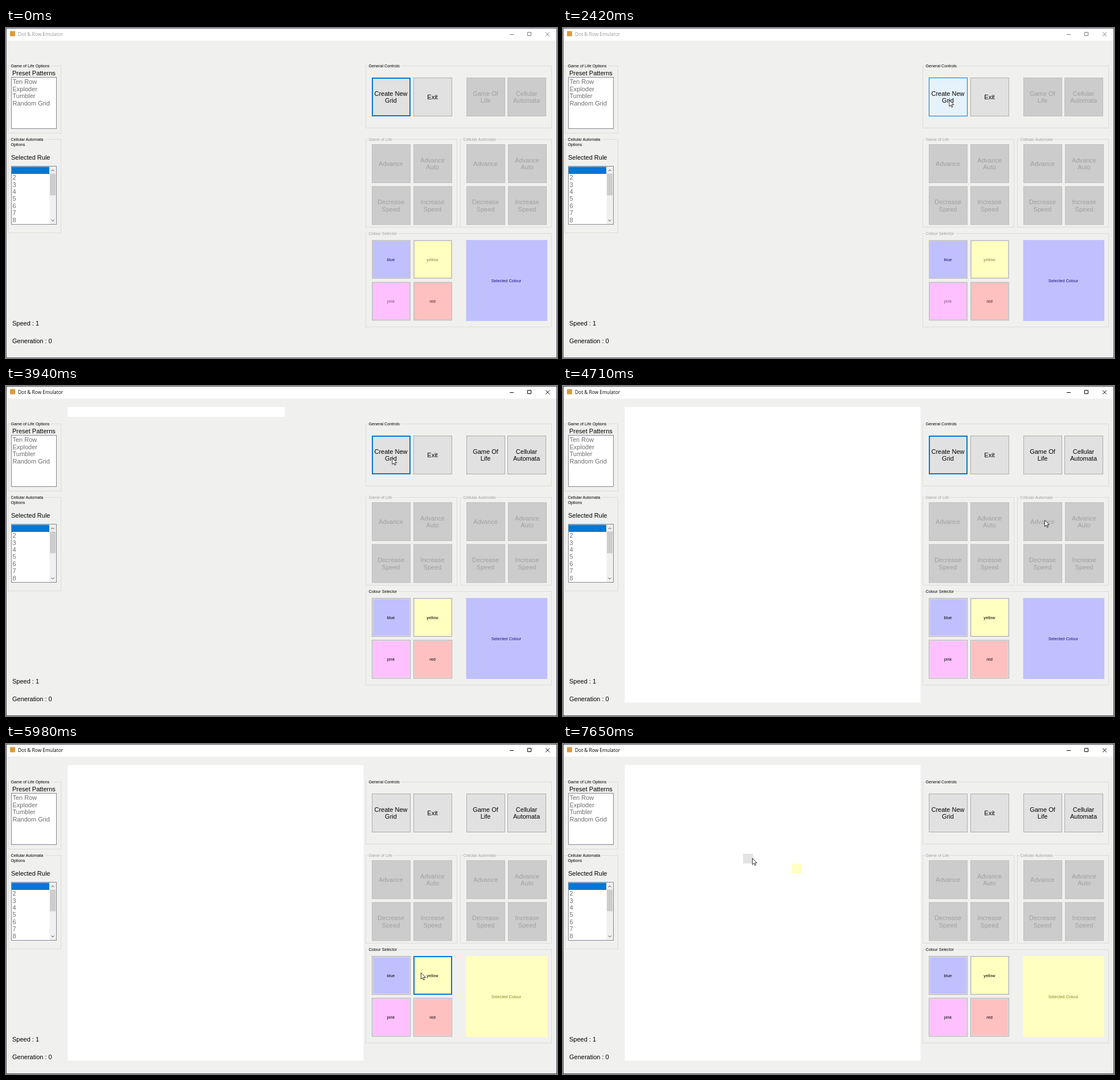
These frames come from a looping animation (967x579 px, 8 s). An HTML page:

```html
<!DOCTYPE html>
<html lang="en">
<head>
<meta charset="utf-8">
<title>Dot &amp; Row Emulator</title>
<style>
  html, body { margin: 0; width: 100%; height: 100%; overflow: hidden; background: #f0f0ee; }
  svg { display: block; font-family: "Liberation Sans", Arial, sans-serif; }
  svg * { animation: none 8s step-end infinite; }

  /* window and group states */
  @keyframes activate { 36.875%, to { fill: #000; } }
  @keyframes activateLine { 36.875%, to { stroke: #000; } }
  @keyframes frame { 36.875%, to { stroke: #42424e; } }
  @keyframes enable { 49.25%, to { fill: #000; } }
  @keyframes busy { 40.125% { fill: #a0a0a0; } 49.25%, to { fill: #000; } }

  /* push buttons */
  @keyframes create {
    0% { fill: #e1e1e1; stroke: #0078d7; }
    28.5% { fill: #e5f1fb; stroke: #0078d7; }
    36.875% { fill: #cce4f7; stroke: #005499; }
    40.125% { fill: #e5f1fb; stroke: #0078d7; }
    49.25% { fill: #e1e1e1; stroke: #0078d7; }
    70.625%, to { fill: #e1e1e1; stroke: #adadad; }
  }
  @keyframes createRing { 28.5% { opacity: 0; } 49.25% { opacity: 1; } 70.625%, to { opacity: 0; } }
  @keyframes exit {
    40.125% { fill: #cacccb; stroke: #bfbfbf; }
    49.25% { fill: #e1e1e1; stroke: #adadad; }
    56.25% { fill: #e5f1fb; stroke: #0078d7; }
    57.125%, to { fill: #e1e1e1; stroke: #adadad; }
  }
  @keyframes life {
    49.25% { fill: #e1e1e1; stroke: #adadad; }
    57.125% { fill: #e5f1fb; stroke: #0078d7; }
    58%, to { fill: #e1e1e1; stroke: #adadad; }
  }
  @keyframes automata {
    49.25% { fill: #e1e1e1; stroke: #adadad; }
    58% { fill: #e5f1fb; stroke: #0078d7; }
    58.875%, to { fill: #e1e1e1; stroke: #adadad; }
  }

  /* colour buttons */
  @keyframes swatch { 49.25%, to { fill: #e4e4e4; stroke: #adadad; } }
  @keyframes blue {
    49.25% { fill: #e4e4e4; stroke: #adadad; }
    60.625% { fill: #c0c0ff; stroke: #0078d7; }
    66.5%, to { fill: #e4e4e4; stroke: #adadad; }
  }
  @keyframes yellow {
    49.25% { fill: #e4e4e4; stroke: #adadad; }
    66.5% { fill: #ffffc0; stroke: #0078d7; }
    70.625% { fill: #ffffc0; stroke: #1c6db5; }
    74.75% { fill: #ffffc0; stroke: #0078d7; }
    86.5%, to { fill: #e0e0d8; stroke: #b4b4b4; }
  }
  @keyframes yellowRing { 74.75% { opacity: 1; } 86.5%, to { opacity: 0; } }
  @keyframes chosen { 74.75%, to { fill: #ffffc0; } }
  @keyframes chosenText { 74.75%, to { fill: #85852a; } }

  /* grid */
  @keyframes grid {
    49.25% { opacity: 1; width: 381px; height: 17px; }
    56.25%, to { opacity: 1; width: 519px; height: 518.5px; }
  }
  @keyframes hoverCell {
    78.875% { opacity: 1; transform: translate(609px, 331px); }
    79.75% { opacity: 1; transform: translate(505px, 262px); }
    80.625% { opacity: 1; transform: translate(436px, 227px); }
    81.5% { opacity: 1; transform: translate(402px, 210px); }
    93.875% { opacity: 1; transform: translate(384px, 192.5px); }
    94.75% { opacity: 1; transform: translate(333px, 192.5px); }
    95.625%, to { opacity: 1; transform: translate(316px, 192.5px); }
  }
  @keyframes paintCell { 89.75%, to { opacity: 1; } }

  /* pointer */
  @keyframes pointer {
    0% { opacity: 0; }
    11.5% { opacity: 1; transform: translate(928px, 547px); }
    12.375% { transform: translate(908px, 491px); }
    13.25% { transform: translate(880px, 420px); }
    14.125% { transform: translate(853px, 360px); }
    15% { transform: translate(835px, 323px); }
    15.875% { transform: translate(829px, 311px); }
    20% { transform: translate(815px, 296px); }
    20.875% { transform: translate(772px, 250px); }
    21.75% { transform: translate(726px, 203px); }
    22.625% { transform: translate(699px, 178px); }
    23.5% { transform: translate(691px, 171px); }
    27.625% { transform: translate(688px, 163px); }
    28.5% { transform: translate(683px, 146px); }
    29.375% { transform: translate(679px, 131px); }
    30.25% { transform: translate(677.5px, 126px); }
    56.25% { transform: translate(735px, 122px); }
    57.125% { transform: translate(838px, 125px); }
    58% { transform: translate(900px, 140px); }
    58.875% { transform: translate(845px, 235px); }
    59.75% { transform: translate(740px, 350px); }
    60.625% { transform: translate(683px, 404px); }
    64.75% { transform: translate(690px, 404px); }
    65.625% { transform: translate(706px, 403px); }
    66.5% { transform: translate(721px, 402px); }
    67.375% { transform: translate(728px, 401px); }
    78% { transform: translate(704px, 387px); }
    78.875% { transform: translate(620px, 338px); }
    79.75% { transform: translate(515px, 275px); }
    80.625% { transform: translate(440px, 231px); }
    81.5% { transform: translate(414.5px, 215.5px); }
    93.875% { transform: translate(392px, 209px); }
    94.75% { transform: translate(348px, 203px); }
    95.625%, to { opacity: 1; transform: translate(332px, 200px); }
  }
  @keyframes click {
    36.875% { opacity: 1; } 40.125% { opacity: 0; }
    70.625% { opacity: 1; } 74.75% { opacity: 0; }
    86.5% { opacity: 1; } 89.75%, to { opacity: 0; }
  }
</style>
</head>
<body>
<svg id="stage" width="967" height="579" viewBox="0 0 967 579"></svg>
<script>
const stage = document.getElementById('stage');
const GREY = '#a0a0a0';

function add(tag, attrs, anim, parent = stage) {
  const node = document.createElementNS('http://www.w3.org/2000/svg', tag);
  for (const key in attrs) node.setAttribute(key, attrs[key]);
  if (anim) node.style.animationName = anim;
  return parent.appendChild(node);
}

const rect = (x, y, width, height, fill, anim, more) =>
  add('rect', { x, y, width, height, fill, ...more }, anim);

// One-pixel border drawn inside the given box.
const box = (x, y, w, h, fill, stroke, anim, more) =>
  rect(x + .5, y + .5, w - 1, h - 1, fill, anim, { stroke, ...more });

const line = (d, stroke, anim) => add('path', { d, stroke, fill: 'none' }, anim);

function text(str, x, y, size = 11, fill = '#000', anim, more) {
  add('text', { x, y, 'font-size': size, fill, ...more }, anim).textContent = str;
}

function centred(label, cx, cy, size, fill, anim) {
  const lines = label.split('|');
  lines.forEach((str, i) => text(str, cx, cy + size * .36 + (i - (lines.length - 1) / 2) * 12.6,
    size, fill, anim, { 'text-anchor': 'middle' }));
}

function group(x, y, w, h, label, gap, fill, anim) {
  box(x, y, w, h, 'none', '#dcdcdc');
  rect(x + 4, y - 4, gap, 9, '#f0f0ee');
  text(label, x + 5.5, y + 3, 7.2, fill, anim);
}

function button(label, x, y, on, anim, textAnim) {
  box(x, y, 68, 68, on ? '#e1e1e1' : '#cccccc', on ? '#adadad' : '#bfbfbf', anim);
  centred(label, x + 33.5, y + 34, 11, on ? '#000' : GREY, textAnim);
}

function swatch(label, x, y, fill, ink, anim = 'swatch') {
  box(x, y, 68, 68, '#c8c8c8', '#c6c6c6', anim);
  rect(x + 2, y + 2, 64, 64, fill);
  centred(label, x + 33.5, y + 34, 7.3, ink, 'enable');
}

const ring = (x, y, opacity, anim) =>
  box(x + 1, y + 1, 66, 66, 'none', '#0078d7', anim, { opacity });

// Window
rect(0, 0, 967, 579, '#f0f0ee');
rect(0, 0, 967, 22, '#fff');
rect(7, 5.5, 9, 9, '#dd9a3c');
text('Dot & Row Emulator', 21, 14, 8.4, '#999', 'activate', { 'font-family': '"Open Sans", sans-serif' });
line('M884 11.5h7', '#777', 'activateLine');
line('M915.5 7.5h6v6h-6z', '#777', 'activateLine');
line('M947 7.5l7 7m0 -7l-7 7', '#777', 'activateLine');
box(0, 0, 967, 579, 'none', '#5c5c6a', 'frame');

// Left column
group(3, 66, 94, 119, 'Game of Life Options', 71, '#000');
text('Preset Patterns', 11, 83);
box(9, 86, 80, 91, '#fff', '#82878f');
['Ten Row', 'Exploder', 'Tumbler', 'Random Grid'].forEach((s, i) =>
  text(s, 11.5, 98.4 + i * 12.4, 11, '#6d6d6d'));

group(3, 195, 94, 165, 'Cellular Automata', 61, '#000');
text('Options', 8.5, 207, 7.2);
text('Selected Rule', 9, 231);
box(9, 242, 80, 103, '#fff', '#82878f');
rect(10, 243.5, 66, 12.5, '#0078d7');
for (let n = 1; n < 9; n++)
  text(n, 11.5, 253.8 + (n - 1) * 12.4, 11, n > 1 ? '#6d6d6d' : '#2670ad');
rect(76.5, 243, 11.5, 101, '#f0f0f0');
rect(77, 255.5, 10, 38, '#cdcdcd');
line('M79.5 251.2l2.5 -2.5 2.5 2.5M79.5 336.3l2.5 2.5 2.5 -2.5', '#404040');

text('Speed : 1', 11, 522.3);
text('Generation : 0', 11, 553.3);

// General controls
group(631, 66, 327, 110, 'General Controls', 58, '#000', 'busy');
button('Create New|Grid', 642, 87, true, 'create', 'busy');
ring(642, 87, 1, 'createRing');
button('Exit', 715, 87, true, 'exit', 'busy');
button('Game Of|Life', 808, 87, false, 'life', 'enable');
button('Cellular|Automata', 880, 87, false, 'automata', 'enable');

// Simulation panels
[[631, 642, 715, 'Game of Life', 45], [797, 808, 881, 'Cellular Automata', 60]].forEach(
  ([x, left, right, label, gap]) => {
    group(x, 195, 161, 155, label, gap, GREY);
    button('Advance', left, 204);
    button('Advance|Auto', right, 204);
    button('Decrease|Speed', left, 277.5);
    button('Increase|Speed', right, 277.5);
  });

// Colour selector
group(631, 360, 327, 165, 'Colour Selector', 54, GREY, 'enable');
swatch('blue', 642, 372, '#c0c0ff', '#10106e', 'blue');
swatch('yellow', 715, 372, '#ffffc0', '#94804c', 'yellow');
ring(715, 372, 0, 'yellowRing');
swatch('pink', 642, 445.5, '#ffc0ff', '#85558a');
swatch('red', 715, 445.5, '#ffc0c0', '#5c1010');
rect(807.5, 372, 142.5, 142, '#c0c0ff', 'chosen');
centred('Selected Colour', 878, 443, 7.4, '#14147a', 'chosenText');

// Grid
rect(108.5, 37, 381, 17, '#fff', 'grid', { opacity: 0 });
rect(0, 0, 17.3, 17.3, '#e3e3e3', 'hoverCell', { opacity: 0 });
rect(402, 210, 17.3, 17.3, '#ffffc0', 'paintCell', { opacity: 0 });

// Pointer
const pointer = add('g', {}, 'pointer');
add('circle', { r: 9, fill: '#fdf440', opacity: 0 }, 'click', pointer);
add('path', {
  d: 'M.4 .4V11.6L3 9.2 4.8 13 6.5 12.2 4.8 8.5H8.3Z',
  fill: '#fff', stroke: '#000', 'stroke-width': .8
}, '', pointer);
</script>
</body>
</html>
```
